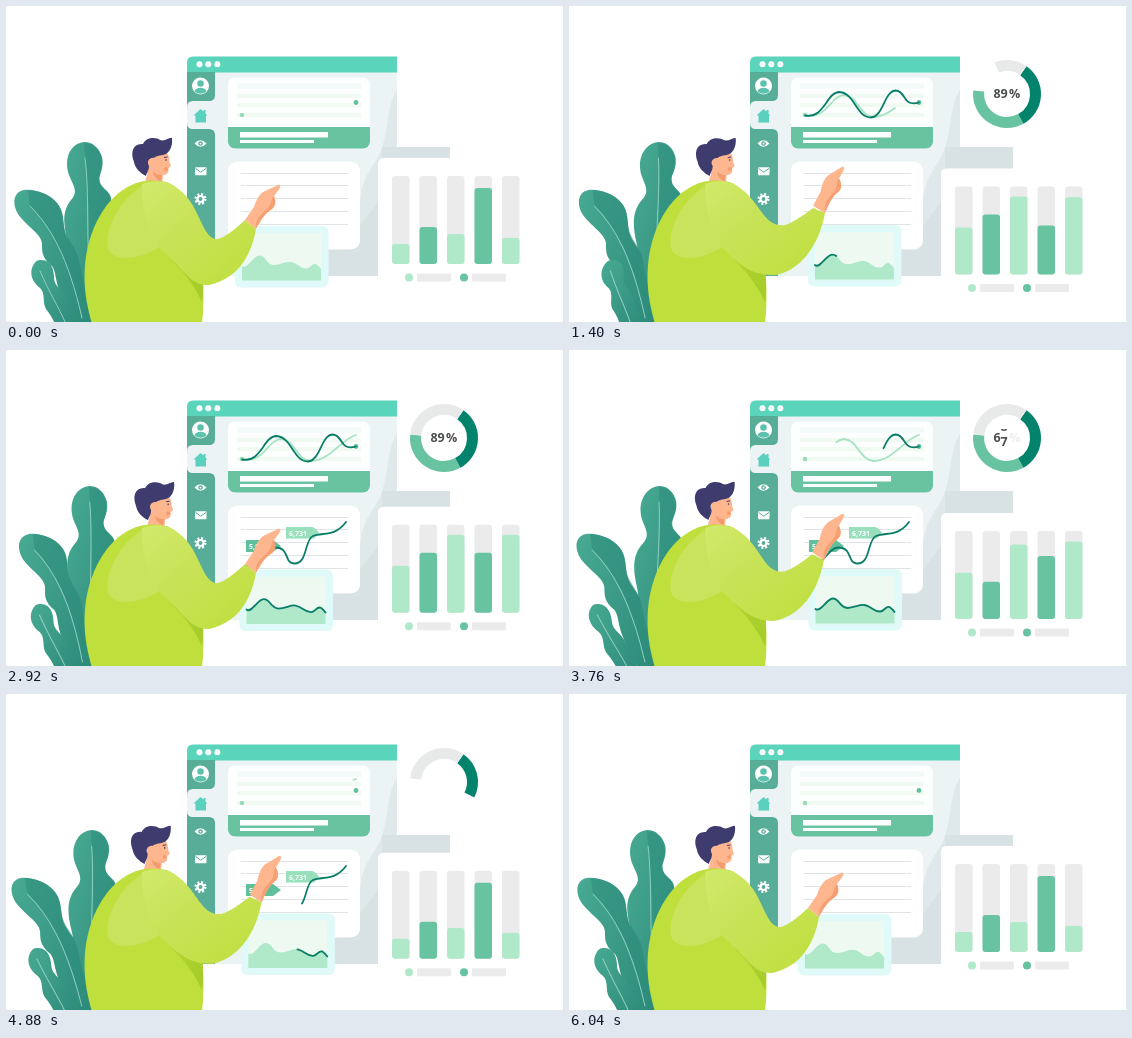
An HTML page that plays this animation: 557 by 316 pixels, repeating every 6080 ms.

```html
<!DOCTYPE html>
<html lang="en">
<head>
<meta charset="utf-8">
<title>Dashboard</title>
<style>
html, body { margin: 0; width: 100%; height: 100%; overflow: hidden; background: #fff; }
svg { display: block; width: 557px; height: 316px; }
.trace { fill: none; stroke: #0a7d68; stroke-width: 1.8; stroke-linecap: round; stroke-linejoin: round; }
.pale { stroke: #a5e3c2; }
.tag { font: 700 7px "Open Sans", "Noto Sans", sans-serif; fill: #fff; }
.num { font: 700 12.5px "Open Sans", "Noto Sans", sans-serif; fill: #4b4d4e; }
.rib { fill: none; stroke: #8fcfbf; stroke-width: 1; stroke-linecap: round; }
</style>
</head>
<body>
<svg viewBox="0 0 557 316">
  <defs>
    <linearGradient id="leafFill" x1="0" y1="0" x2="1" y2="1">
      <stop offset="0" stop-color="#48aa93"/><stop offset="1" stop-color="#2b8877"/>
    </linearGradient>
    <linearGradient id="armFill" x1="0" y1="0" x2="1" y2="1">
      <stop offset="0" stop-color="#d2ea6c"/><stop offset=".35" stop-color="#c9e35a"/><stop offset="1" stop-color="#bfdf3c"/>
    </linearGradient>
    <linearGradient id="foldFill" x1="0" y1="0" x2="1" y2="1">
      <stop offset="0" stop-color="#bddd3c"/><stop offset="1" stop-color="#a4cb28"/>
    </linearGradient>
    <clipPath id="reel"><rect x="420" y="79" width="36" height="17.500"/></clipPath>
    <clipPath id="topCard"><rect x="222" y="71.500" width="142" height="71" rx="7"/></clipPath>
  </defs>

  <!-- window -->
  <path d="M181 66H391V270H181Z" fill="#ebf3f5"/>
  <path d="M391 84C381 98 383 122 376 142C370 160 355 168 354 198V270H391Z" fill="#dfe8ea"/>
  <path d="M376 141H444V170H376ZM354 220L372 196V270H322V236H354Z" fill="#d8e2e4"/>
  <path d="M181 66.500V56.500Q181 50.500 187 50.500H391.500V66.500Z" fill="#5bd4bc"/>
  <g fill="#fff"><circle cx="193.500" cy="58.300" r="3"/><circle cx="202.300" cy="58.300" r="3"/><circle cx="211.300" cy="58.300" r="3"/></g>
  <path d="M181 66H209V89Q209 95 203 95H187Q181 95 181 101ZM181 117Q181 123 187 123H203Q209 123 209 129V270H181Z" fill="#58ad98"/>
  <circle cx="194.500" cy="80" r="8.500" fill="#fff"/>
  <circle cx="194.500" cy="77.500" r="3.300" fill="#5cc2ae"/>
  <path d="M188.500 85.500C189.500 80.500 199.500 80.500 200.500 85.500Q194.500 90 188.500 85.500Z" fill="#5cc2ae"/>
  <path d="M187.500 109.500L194.500 103L197.500 105.500V104H199.500V107.500L201.500 109.500H200V116.500H189.500V109.500Z" fill="#5bd0be"/>
  <path d="M188.500 137.500Q194.500 131 200.500 137.500Q194.500 144 188.500 137.500Z" fill="#fff"/>
  <circle cx="194.500" cy="137.500" r="2.300" fill="#58ad98"/><circle cx="194.500" cy="137.500" r="1" fill="#fff"/>
  <rect x="189" y="161.300" width="11.500" height="8" rx="1" fill="#fff"/>
  <path d="M189.500 162.300L194.800 166.300L200 162.300" fill="none" stroke="#58ad98" stroke-width="1"/>
  <circle cx="194.500" cy="193" r="4.700" fill="none" stroke="#fff" stroke-width="2.600" stroke-dasharray="1.850 1.850"/>
  <circle cx="194.500" cy="193" r="3" fill="none" stroke="#fff" stroke-width="2.200"/>

  <!-- upper card -->
  <g clip-path="url(#topCard)">
    <path d="M222 71H364V143H222Z" fill="#fdfefe"/>
    <path d="M222 121H364V143H222Z" fill="#69c3a1"/>
  </g>
  <path d="M234 126H322V131.500H234ZM234 134H308V137H234Z" fill="#fff"/>
  <path d="M231 80H355" stroke="#f4f9f9" stroke-width="5"/>
  <path d="M231 90H355M231 99H355M231 109H355" stroke="#f0faf2" stroke-width="4"/>
  <circle cx="236" cy="109" r="2.200" fill="#93dab8"/><circle cx="350" cy="96.500" r="2.400" fill="#62bf9c"/>
  <path id="topPale" class="trace pale" pathLength="1" d="M236 109C258 114 261 90 275 89C289 90 291 111 305 111C325 110 334 90 350 85"/>
  <path id="topDark" class="trace" pathLength="1" d="M236 109.500C256 113 257 86 270.500 86C286 87 287 111.500 302 111.500C315 110 315 84.500 327 84.500C338 86 333 101 350 96.500"/>

  <!-- middle card -->
  <rect x="222" y="155.500" width="132" height="88" rx="9" fill="#fff"/>
  <path d="M235 167.500H342M235 179.500H342M235 192.500H342M235 205.500H342M235 218.500H342" stroke="#e0e4e5" stroke-width="1"/>
  <g id="tagLow"><path d="M240 190H267L275 196L267 202H240Z" fill="#62bf9c"/><text class="tag" x="243" y="198.500">5,831</text></g>
  <g id="tagHigh"><path d="M280 177H306Q310 178 313 183L308 188.500H280Z" fill="#98dfbc"/><text class="tag" x="283" y="185.500">6,731</text></g>
  <path id="midDark" class="trace" pathLength="1" d="M240 216C256 216 258 198 269 197.500C284 197 278 213.500 288 213.500C302 214 298 190 307 186C317 182 329 187 340 172"/>

  <!-- ring -->
  <path d="M391 45H557V141H399Q391 141 391 133Z" fill="#fff"/>
  <g id="ring" fill="none" stroke-width="11"></g>
  <g clip-path="url(#reel)"><g id="digits" class="num">
    <text x="424.500"></text><text x="424.500"></text><text x="431.500"></text><text x="431.500"></text>
  </g></g>
  <text id="percent" class="num" x="440" y="92.300">%</text>

  <!-- bars -->
  <g id="bars"><path d="M372 300V158Q372 152 378 152H557V300Z" fill="#fff"/></g>

  <!-- tablet -->
  <g id="tablet">
    <rect x="229" y="220" width="93.500" height="61.500" rx="6" fill="#dffaf8"/>
    <rect x="236" y="227" width="79" height="47.500" fill="#eef9f1"/>
    <path id="area" fill="#b0e9c9"/>
    <path id="areaLine" class="trace" pathLength="1"/>
  </g>

  <!-- plants -->
  <g id="leafTall">
    <path d="M78 136C66 137 58 150 62 166C65 177 74 184 65 194C55 206 58 222 62 236C68 256 66 285 76 330H110V230C112 215 106 205 105 192C104 184 93 182 93 172C95 166 98 160 96 151C93 142 87 136 78 136Z" fill="url(#leafFill)"/>
    <path d="M78 137C91 137 98 150 95 163C92 174 94 182 101 186C107 195 104 205 107 215L110 230V330H88C80 270 86 220 82 190Z" fill="#2f917e" opacity=".65"/>
    <path class="rib" d="M79 152C84 190 79 230 86 316"/>
  </g>
  <g id="leafWide">
    <path d="M18 184C30 183 43 188 51 197C58 205 57 216 59 226C61 236 70 241 73 254C78 280 84 300 90 330H76C66 312 58 298 53 284C49 272 50 266 46 260C36 252 36 246 36 238C36 228 20 220 12 208C6 198 7 186 18 184Z" fill="url(#leafFill)"/>
    <path d="M22 184C40 185 56 195 57 212C57 232 70 238 73 254C77 276 80 290 84 310L76 316C62 250 46 222 24 200Z" fill="#2d8c7a" opacity=".55"/>
    <path class="rib" d="M24 200C44 220 62 250 76 312"/>
  </g>
  <g id="leafSmall">
    <path d="M34 254C44 253 48 262 48 272C48 280 56 283 60 292C66 304 70 316 74 330H52C50 316 44 308 40 303C36 296 40 288 34 282C26 276 24 268 26 262C28 257 30 254 34 254Z" fill="url(#leafFill)"/>
    <path class="rib" d="M34 265C44 288 52 300 60 318"/>
  </g>

  <!-- person -->
  <g id="head">
    <path d="M142 150L158 145C163 147 163.500 153 163.500 156L165 160L162.500 162C163 167 161 169 157 169L156 180H138L142 165Z" fill="#fdb68e"/>
    <path d="M156 169Q150 169 147 165Q148 173 155 175Z" fill="#f39b6c"/>
    <circle cx="160" cy="163" r="2" fill="#fa9a70"/>
    <circle cx="145.500" cy="157" r="3.500" fill="#fdb68e"/>
    <path d="M158 151.500L161.500 151" stroke="#3e3b6e" stroke-width="1"/><circle cx="160" cy="154" r=".8" fill="#3e3b6e"/>
    <path d="M128 156C124 146 127 137 137 138C140 131 150 131 154 134C159 136 163 131 166 132C167 141 163 148 157 149C152 150 150 150 148 152C144 151 140 155 143 160C143 165 140 168 140 170C134 167 129 162 128 156Z" fill="#3e3b6e"/>
  </g>
  <path d="M134 176C110 182 87 208 80 250C76 280 81 300 86 318H196C198 300 198 282 196 262L190 215C184 195 170 178 160 176C150 174 142 174 134 176Z" fill="#bfdf3c"/>
  <path d="M136 180C108 198 97 230 103 245C112 257 135 252 152 242L180 205Z" fill="#c9e35c"/>
  <path d="M144 215C146 246 178 256 196 296C198 282 197 270 195 258Z" fill="url(#foldFill)"/>
  <path id="arm" fill="url(#armFill)"/>
  <g id="hand">
    <path d="M239 214L248 201C250 194 254 187 259 185L272 179C276 178 275 182 268 190C270 195 270 200 266 203C261 206 257 210 250 223Z" fill="#fdb68e"/>
    <path d="M268 190C270 195 270 200 266 203C261 206 257 210 250 222C249 212 257 207 262 202C266 198 264 193 268 190Z" fill="#f69f72"/>
  </g>
</svg>
<script>
const LOOP = 6080, STEP = 40;
const $ = id => document.getElementById(id);
const make = (parent, name, attrs) => {
  const el = document.createElementNS("http://www.w3.org/2000/svg", name);
  for (const k in attrs) el.setAttribute(k, attrs[k]);
  return parent.appendChild(el);
};
const ease = u => (1 - Math.cos(Math.PI * Math.min(1, Math.max(0, u)))) / 2;
const span = (t, a, b) => ease((t - a) / (b - a));

// keys: time, value pairs
function track(keys, t) {
  if (t <= keys[0]) return keys[1];
  for (let i = 2; i < keys.length; i += 2) {
    if (t <= keys[i])
      return keys[i - 1] + (keys[i + 1] - keys[i - 1]) * span(t, keys[i - 2], keys[i]);
  }
  return keys[keys.length - 1];
}

const FLOAT = [0, 0, 1240, 1, 2320, 0, 3640, 1, 3960, 1, 6080, 0];
const POINT = [0, 0, 1200, 1, 1400, 1, 2760, 0, 2880, 0, 4100, 1, 4640, 1, 6080, 0];
const LEAN = [1160, 0, 2200, 1, 3500, -.05, 4700, -.25, 6080, 0];
const SPROUT = [0, 0, 1320, 8, 2280, 3, 3760, -6, 6080, 0];
const HEIGHTS = [
  [0, 20, 1200, 47, 3650, 47, 4700, 20],
  [0, 37, 1200, 60, 3000, 60, 3800, 37],
  [200, 30, 1400, 78, 3500, 78, 5000, 30],
  [0, 76, 1300, 49, 1600, 49, 3000, 60, 3800, 63, 4800, 76],
  [300, 26, 1500, 78, 3700, 78, 4800, 26]
];
// id, draw start, draw end, erase start, erase end
const LINES = [
  ["topDark", 200, 1300, 3100, 4160],
  ["topPale", 500, 1800, 3060, 5060],
  ["midDark", 1400, 2400, 4360, 5360],
  ["areaLine", 1080, 1980, 4360, 5260]
];
const LIGHT = "#b0e9c9", MID = "#68c3a1", GREY = "#ebebeb";

const wave = "M236 260C241 264 247 250 253 249.5C260 249 260 259 268 259C275 259 280 255 285 256C292 257 294 263 301 262.5C305 262 306 257 310 258Q313 260 315 263";
$("area").setAttribute("d", wave + "V274.5H236Z");
$("areaLine").setAttribute("d", wave);

const bars = HEIGHTS.map((keys, i) => {
  const x = 386 + i * 27.5;
  make($("bars"), "rect", { x, y: 170, width: 17.5, height: 88, rx: 3, fill: GREY });
  return make($("bars"), "rect", { x, width: 17.5, rx: 3, fill: i % 2 ? MID : LIGHT });
});
[[403, LIGHT], [458, MID]].forEach(([x, fill]) => {
  make($("bars"), "circle", { cx: x, cy: 271.5, r: 4, fill });
  make($("bars"), "rect", { x: x + 8, y: 267.5, width: 34, height: 8, rx: 1, fill: GREY });
});

// sweep in degrees, measured anticlockwise from the left
const arcs = [[0, 125, MID], [125, 241, "#03836b"], [241, 360, "#e8eaea"]]
  .map(([from, to, stroke]) => ({ from, to, el: make($("ring"), "path", { stroke }) }));
const rim = sweep => {
  const a = (186 - sweep) * Math.PI / 180;
  return (438 + 28.5 * Math.cos(a)).toFixed(2) + " " + (88 + 28.5 * Math.sin(a)).toFixed(2);
};

function drawLine([id, a, b, c, d], t) {
  const from = span(t, c, d), to = span(t, a, b), el = $(id);
  el.style.display = to - from > .001 ? "" : "none";
  el.setAttribute("stroke-dasharray", (to - from) + " 2");
  el.setAttribute("stroke-dashoffset", -from);
}

function drawRing(t) {
  const tail = 360 * span(t, 4140, 5740), tip = 360 * span(t, 240, 1840);
  arcs.forEach(({ from, to, el }) => {
    const a = Math.max(from, tail), b = Math.min(to, tip);
    el.setAttribute("d", b - a > .1 ? `M${rim(a)}A28.5 28.5 0 0 0 ${rim(b)}` : "");
  });
}

function drawCount(t) {
  const value = 89 * (span(t, 400, 1360) - span(t, 3440, 4412));
  const units = value % 10, tens = Math.floor(value / 10) + Math.max(0, units - 9);
  const cells = $("digits").children;
  [tens, units].forEach((v, col) => {
    const base = Math.floor(v + 1e-6), part = Math.max(0, v - base);
    [0, 1].forEach(k => {
      const cell = cells[col * 2 + k];
      cell.textContent = (base + k) % 10;
      cell.setAttribute("y", 92.3 + (part - k) * 15);
    });
  });
  $("digits").style.opacity = span(t, 400, 600) - span(t, 4200, 4412);
  $("percent").style.opacity = span(t, 1160, 1360) - span(t, 3440, 3840);
}

function sway(id, shift, top, base) {
  const k = shift / (top - base);
  $(id).setAttribute("transform", `matrix(1 0 ${k} 1 ${-k * base} 0)`);
}

function drawArm(h) {
  const ex = 203 + 4 * h, ey = 279 - 10 * h;
  const ux = 239 + 5 * h, uy = 214 - 12 * h, lx = 250 + 6 * h, ly = 223 - 16 * h;
  const ix = 212 + 4 * h, iy = 233 - 14 * h;
  $("arm").setAttribute("d", `M136 178C150 173 166 174 180 190C194 205 198 ${iy + 2} ${ix} ${iy}` +
    `Q${ix + 10} ${iy - 3} ${ux} ${uy}L${lx} ${ly}C${lx - 5} ${ly + 28} ${ex + 28} ${ey - 6} ${ex} ${ey}` +
    `C${ex - 18} ${ey + 1} 178 264 165 253C146 238 136 212 136 178Z`);
  $("hand").setAttribute("transform", `translate(${5.5 * h} ${-15 * h}) rotate(${-7 * h} 245 217)`);
}

function drawTag(id, t, from, x, y) {
  const s = span(t, from, from + 320) - span(t, from + 3640, from + 3960);
  $(id).style.opacity = s;
  $(id).setAttribute("transform", `translate(${x} ${y}) scale(${.6 + .4 * s}) translate(${-x} ${-y})`);
}

function render(t) {
  const f = track(FLOAT, t), lean = track(LEAN, t);
  LINES.forEach(line => drawLine(line, t));
  drawRing(t);
  drawCount(t);
  drawTag("tagLow", t, 1560, 275, 196);
  drawTag("tagHigh", t, 1800, 313, 183);
  $("bars").setAttribute("transform", `translate(0 ${11 * f})`);
  bars.forEach((bar, i) => {
    const h = track(HEIGHTS[i], t);
    bar.setAttribute("y", 258 - h);
    bar.setAttribute("height", h);
  });
  $("tablet").setAttribute("transform", `translate(${10.5 * f} ${-f})`);
  sway("leafTall", 12 * f, 136, 325);
  sway("leafWide", 12 * lean, 195, 325);
  sway("leafSmall", track(SPROUT, t), 260, 335);
  $("head").setAttribute("transform", `translate(${5.5 * lean} ${.5 * lean})`);
  drawArm(track(POINT, t));
}

function tick() {
  const t = performance.now() % LOOP;
  render(Math.floor(t / STEP) * STEP);
  requestAnimationFrame(tick);
}
tick();
</script>
</body>
</html>
```
